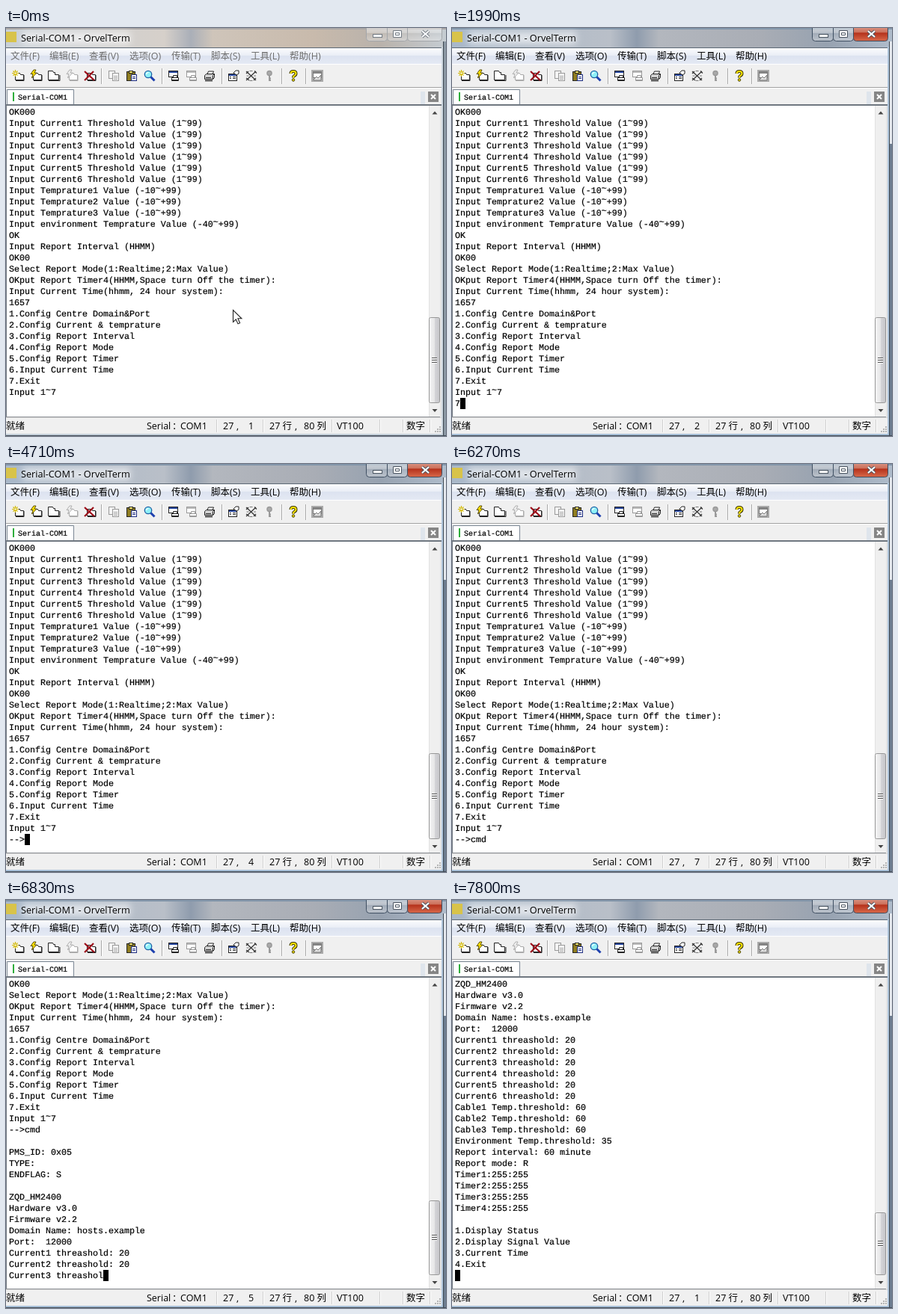
An HTML page that plays this animation: 588x546 px, repeating every 8 s.

```html
<!DOCTYPE html>
<html lang="zh">
<head>
<meta charset="utf-8">
<title>Serial console</title>
<style>
html, body { margin: 0; width: 100%; height: 100%; overflow: hidden; }
svg { display: block; }
text { white-space: pre; font: 12.5px "Open Sans", "Noto Sans CJK SC", "Noto Sans CJK", sans-serif; fill: #000; }
.mono text, text.tab { font-family: "Liberation Mono", monospace; text-rendering: geometricPrecision; stroke: #000; stroke-width: .2; }
.mono text { font-size: 11.665px; }
text.tab { font-size: 10px; }
text.caption { font-size: 12.7px; }
</style>
</head>
<body>
<svg id="stage" width="588" height="546" viewBox="0 0 588 546">
<defs>
  <linearGradient id="idle"><stop offset="0" stop-color="#c9d0d7"/><stop offset=".36" stop-color="#d6d0ca"/><stop offset=".42" stop-color="#aaafb8"/><stop offset=".47" stop-color="#cfc5ba"/><stop offset=".7" stop-color="#c8baac"/><stop offset=".85" stop-color="#b9b2ab"/><stop offset="1" stop-color="#c5ccd2"/></linearGradient>
  <linearGradient id="live"><stop offset="0" stop-color="#a9b8c9"/><stop offset=".36" stop-color="#b9bfc8"/><stop offset=".42" stop-color="#8f9cad"/><stop offset=".47" stop-color="#b3b7be"/><stop offset=".7" stop-color="#a9adb5"/><stop offset=".85" stop-color="#97a2b0"/><stop offset="1" stop-color="#afbccb"/></linearGradient>
  <linearGradient id="menu" x2="0" y2="1"><stop offset="0" stop-color="#fbfcfe"/><stop offset=".45" stop-color="#eaeef6"/><stop offset=".5" stop-color="#dde3f0"/><stop offset="1" stop-color="#e4e9f4"/></linearGradient>
  <linearGradient id="red" x2="0" y2="1"><stop offset="0" stop-color="#dfa394"/><stop offset=".45" stop-color="#cc6f5a"/><stop offset=".5" stop-color="#b5321c"/><stop offset="1" stop-color="#d8694a"/></linearGradient>
  <linearGradient id="glass" x2="0" y2="1"><stop offset="0" stop-color="#fff" stop-opacity=".55"/><stop offset=".48" stop-color="#fff" stop-opacity=".35"/><stop offset=".52" stop-color="#fff" stop-opacity=".08"/><stop offset="1" stop-color="#fff" stop-opacity=".35"/></linearGradient>
  <linearGradient id="thumb"><stop offset="0" stop-color="#f5f5f5"/><stop offset=".5" stop-color="#e6e6e7"/><stop offset=".52" stop-color="#d5d5d8"/><stop offset="1" stop-color="#c6c6ca"/></linearGradient>
  <filter id="soft" x="-20%" y="-60%" width="140%" height="220%"><feGaussianBlur stdDeviation="5"/></filter>
</defs>
<g id="frame"></g>
<g id="bars"></g>
<g id="term" class="mono"></g>
<rect id="caret" y="495" width="7" height="15"/>
<g id="scroll"></g>
<g id="status"></g>
<path id="mouse" d="M303.5 377.5v16l3.8-3.6 2.7 6 2.6-1.1-2.7-6h5z" fill="#fff" stroke="#222" stroke-width="1.1"/>
</svg>
<script>
const $ = id => document.getElementById(id);
const esc = s => s.replace(/&/g, '&amp;').replace(/</g, '&lt;').replace(/>/g, '&gt;');
const rect = (x, y, w, h, fill, more = '') => `<rect x="${x}" y="${y}" width="${w}" height="${h}" fill="${fill}" ${more}/>`;
const path = (d, stroke, width = 1, fill = 'none') => `<path d="${d}" fill="${fill}" stroke="${stroke}" stroke-width="${width}"/>`;
const text = (x, y, s, more = '') => `<text x="${x}" y="${y}" ${more}>${esc(s)}</text>`;
const range = (n, fn) => Array.from({ length: n }, (_, i) => fn(i + 1));

// Console contents
const ROWS = 27, LEFT = 4, CHAR = 7, LINE = 15;
const log = [
  'OK000',
  ...range(6, i => `Input Current${i} Threshold Value (1~99)`),
  ...range(3, i => `Input Temprature${i} Value (-10~+99)`),
  'Input environment Temprature Value (-40~+99)',
  'OK', 'Input Report Interval (HHMM)', 'OK00',
  'Select Report Mode(1:Realtime;2:Max Value)',
  'OKput Report Timer4(HHMM,Space turn Off the timer):',
  'Input Current Time(hhmm, 24 hour system):', '1657',
  '1.Config Centre Domain&Port', '2.Config Current & temprature',
  '3.Config Report Interval', '4.Config Report Mode',
  '5.Config Report Timer', '6.Input Current Time', '7.Exit', 'Input 1~7'
];
const reply = [
  '-->cmd', '', 'PMS_ID: 0x05', 'TYPE:', 'ENDFLAG: S', '',
  'ZQD_HM2400', 'Hardware v3.0', 'Firmware v2.2',
  'Domain Name: hosts.example', 'Port:  12000',
  ...range(6, i => `Current${i} threashold: 20`),
  ...range(3, i => `Cable${i} Temp.threshold: 60`),
  'Environment Temp.threshold: 35', 'Report interval: 60 minute', 'Report mode: R',
  ...range(4, i => `Timer${i}:255:255`), '',
  '1.Display Status', '2.Display Signal Value', '3.Current Time', '4.Exit', ''
].join('\n');
const upTo = s => reply.slice(0, reply.indexOf(s) + s.length);

// The console font has a raised tilde
const consoleLine = (s, i) => text(LEFT, 115.5 + i * LINE, s)
  .replace('~', '<tspan dy="-3">~</tspan><tspan dy="3">\u200b</tspan>')
  .replace('\u200b</tspan>', '</tspan>')
  .replace(/<tspan dy="3"><\/tspan>(.*)<\/text>/, '<tspan dy="3">$1</tspan></text>');

// [start ms, text after the log, caret shown, column in the status bar]
const steps = [
  [0, '', 0, 1], [500, '', 1, 1], [1030, '', 0, 1], [1560, '', 1, 1],
  [1990, '7', 1, 2], [2140, '7', 0, 2],
  [2450, '-->', 1, 4], [3160, '-->', 0, 4], [3600, '-->', 1, 4],
  [4150, '-->', 0, 4], [4710, '-->', 1, 4], [5270, '-->', 0, 4],
  [5730, '-->c', 1, 5], [5850, '-->cm', 1, 6], [6000, '-->cmd', 1, 7], [6270, '-->cmd', 0, 7],
  [6680, upTo('ZQD_HM'), 0, 1],
  [6830, upTo('Current3 threashol'), 1, 5],
  [6980, upTo('Cable3 Temp'), 1, 12],
  [7100, upTo('Timer1:255:255\nT'), 1, 30],
  [7250, reply, 0, 1], [7800, reply, 1, 1]
];
const LOOP = 8000, FOCUS = 500, MOUSE_END = 1990;

// Window frame and caption
function drawFrame(active) {
  const ink = active ? '#3f4f62' : '#a3a6aa';
  const button = (x, w, fill) => rect(x, -4, w, 21.5, fill, `rx="4" stroke="${ink}"`);
  const glyph = active ? '#fff' : '#f6f8fa';
  const edge = active ? '#4a5561' : '#747b83';
  $('frame').innerHTML =
    rect(0, 0, 588, 546, active ? 'url(#live)' : 'url(#idle)') +
    rect(0, 0, 588, 2, active ? '#8396aa' : '#a9a6a6') +
    rect(22, 5, 144, 17, '#fff', 'opacity=".6" filter="url(#soft)"') +
    rect(0, 5, 14, 14, '#d8c34a') +
    text(20, 17.5, 'Serial-COM1 - OrvelTerm', 'class="caption"') +
    button(481.5, 28, 'url(#glass)') + button(509.5, 27, 'url(#glass)') +
    button(536.5, 46, active ? 'url(#red)' : 'url(#glass)') +
    rect(490.5, 8.5, 12, 4, glyph, `stroke="${edge}"`) +
    path('M517.5 3.5h11v9h-11zM520.5 6.5h5v3h-5z', edge, 1, glyph) +
    path('M556 4l9 8M565 4l-9 8', edge, 4) + path('M556 4l9 8M565 4l-9 8', glyph, 2.2) +
    rect(582, 25, 2, 521, active ? '#b3c9df' : '#cfd9e2') +
    rect(584, 18, 1, 528, '#3c4650') +
    rect(585, 18, 3, 528, active ? '#6d7d90' : '#8b98a4') +
    (active ? rect(585, 18, 3, 137, '#e3e7ec') : '') +
    rect(0, 543, 584, 2, active ? '#a8c0d8' : '#c5d0da') + rect(0, 545, 588, 1, '#414b56');
  const names = ['文件(F)', '编辑(E)', '查看(V)', '选项(O)', '传输(T)', '脚本(S)', '工具(L)', '帮助(H)'];
  const xs = [6, 58, 111, 165, 221, 274, 327, 379];
  $('bars').innerHTML =
    rect(0, 26, 582, 1, '#5c6874') + rect(0, 27, 582, 21, 'url(#menu)') +
    names.map((s, i) => text(xs[i], 42, s, active ? '' : 'style="fill:#6d6d6d"')).join('') +
    toolbar + tabs;
}

// Toolbar icons are drawn in a 16 x 16 cell
const sheet = (x, y, w, h, c = '#222', fill = '#fff') =>
  rect(x + .5, y + .5, w, h, fill, `stroke="${c}"`);
const win = (x, y, w, h, c = '#222', bar = '#24449c') => sheet(x, y, w, h, c) + rect(x + 1, y + 1, w - 1, 2, bar);
const tabbed = c => path('M4.500 13.500V4.500h6l1 2h4v7z', c, 1, '#fff') + path('M5 14.500h11V7', c);
const bolt = (c, fill) => path('M5 0L1 5.500h3L2.500 11l6.500-7H6l2-4z', c, .9, fill);
const printer = (c, fill) =>
  path('M4.500 7l2-5h7l-2 5', c, 1, '#fff') + path('M1.500 7.500l2-2h11l-2 2v5h-11zM12.500 12.500l2-2v-5', c, 1, fill) +
  path('M3 10.500h7', c, 1) + path('M2 14.500h10', c, 1.5);
const smallPrint = (c, bar) => win(1, 1, 12, 8, c, bar) +
  path('M5.500 10.500h9v4h-9zM7.500 10V7.500h5V10', c, 1, '#fff') + path('M6 13.500h8', c, 1);
const hook = 'M4.500 5Q4.500 2 8 2t3.500 3Q11.500 7 9 8.200 8 8.800 8 10.500';
const icons = [
  [16, tabbed('#222') + path('M4.500 0v9M0 4.500h9M1.500 1.500l6 6M7.500 1.500l-6 6', '#d2b800', 1.2) + rect(3.5, 3.5, 2, 2, '#fff')],
  [40, tabbed('#222') + bolt('#4b4200', '#ffe000')],
  [64, path('M.500 13.500v-12h6l1 2h2v3h5v7z', '#222', 1, '#fff') + path('M1 14.500h15V7', '#222')],
  [88, tabbed('#aaa') + bolt('#aaa', '#eee')],
  [112, tabbed('#222') + path('M1 2l13 12M13 2L1 14', '#9c0c18', 2.2)],
  [144, sheet(1, 1, 8, 10, '#999', '#f4f4f4') + sheet(6, 4, 8, 10, '#999', '#f4f4f4') + path('M8 8.500h5M8 10.500h5M8 12.500h5', '#aaa')],
  [168, sheet(1, 2, 11, 12, '#222', '#8f7d20') + sheet(4, 1, 5, 3, '#222', '#f3e36a') + sheet(7, 6, 7, 8, '#1c2c80') + path('M9 9.500h4M9 11.500h4', '#1c2c80')],
  [192, path('M9 9l5.500 5.500', '#1d3fae', 3) + `<circle cx="6" cy="6" r="4.7" fill="#8ff1f7" stroke="#1f5fa5" stroke-width="1.3"/>` + path('M3.500 6q.5-2.500 3-2.500', '#fff', 1.2)],
  [224, smallPrint('#222', '#24449c')],
  [248, smallPrint('#999', '#bbb')],
  [272, printer('#222', '#cfcfcf')],
  [304, win(1, 5, 11, 9) + path('M3 9.500h2M7 9.500h4M3 11.500h2M7 11.500h4', '#333') + path('M8 4l3-3h4v4l-3 2z', '#222', 1, '#fff')],
  [328, path('M1 2l13 12M14 2L1 14', '#333', 1.2) + path('M1 5l3-3M11 14l3-3M12 1.500l3 3M1 11l4 3', '#333', 1.2) + path('M5.500 1.500h4M5.500 14.500h4M1.500 8h3M11 8h3', '#777')],
  [352, `<circle cx="8" cy="4.5" r="3" fill="#aaa" stroke="#999" stroke-width="1.5"/>` + path('M8 8v7M8 11.500h2M8 14h2', '#999', 2)],
  [384, path(hook, '#3a3500', 4) + path(hook, '#ffe600', 2) + `<circle cx="8" cy="13.5" r="1.7" fill="#ffe600" stroke="#3a3500"/>`],
  [416, rect(0, 0, 16, 16, '#aaa') + win(2, 2, 11, 8, '#777', '#888') + path('M3 13l4-4 2 2 4-4v7H3z', '#777', 1, '#ddd')]
];
const toolbar =
  rect(0, 48, 582, 55, '#f0f0f0') + rect(0, 48, 582, 1, '#fff') +
  icons.map(([x, art]) => `<g transform="translate(${x - 8} 56)">${art}</g>`).join('') +
  [127, 208, 288, 368, 400].map(x => rect(x, 54, 1, 21, '#a8a8a8') + rect(x + 1, 54, 1, 21, '#fff')).join('') +
  rect(0, 79, 582, 1, '#a0a0a0') + rect(0, 80, 582, 1, '#fff');
const tabs =
  path('M1.500 103V82.500h89V103', '#7b8794', 1, '#fff') +
  rect(9, 86, 2, 12, '#2fae3c') + text(16, 95.5, 'Serial-COM1', 'class="tab"') +
  rect(554, 85, 6, 17, '#dfe5ec') +
  rect(564, 85, 14, 14, '#858585') + path('M568 89l6 6M574 89l-6 6', '#fff', 2) +
  rect(0, 102, 582, 2, '#6f7780') + rect(0, 102, 1, 419, '#6f7780') +
  rect(1, 104, 565, 416, '#fff') + rect(0, 520, 582, 1, '#8b8f94') + rect(580, 104, 2, 417, '#e4e4e4');

function drawScroll(extra) {
  const h = Math.round(115 * 87 / (87 + extra)), top = 502 - h, mid = top + Math.round(h / 2) - 3.5;
  $('scroll').innerHTML =
    rect(565, 104, 15, 416, '#efefef') + rect(565, 104, 1, 416, '#e2e2e2') +
    path('M569.500 115.500l3.500-4 3.500 4z', 'none', 0, '#444') +
    path('M569.500 510l3.500 4 3.500-4z', 'none', 0, '#444') +
    rect(565.5, top + .5, 14, h - 1, 'url(#thumb)', 'rx="2" stroke="#979797"') +
    path(`M569 ${mid}h7m-7 3h7m-7 3h7`, '#555', 1) +
    path(`M569 ${mid + 1}h7m-7 3h7m-7 3h7`, '#fff', 1);
}

function drawStatus(col) {
  const labels = [[0, '就绪'], [188, 'Serial'], [222, '：'], [233, 'COM1'], [290, '27'], [308, ','],
    [352, '27 行'], [386, ','], [398, '80 列'], [442, 'VT100'], [535, '数字']];
  let grip = '';
  for (let r = 0; r < 3; r++)
    for (let c = 2 - r; c < 3; c++) grip += rect(573 + c * 3, 533 + r * 3, 2, 2, '#b4b4b4');
  $('status').innerHTML =
    rect(0, 521, 582, 22, '#f0f0f0') + rect(0, 521, 582, 1, '#d7d7d7') +
    [281, 343, 435, 499, 530, 566].map(x => rect(x, 524, 1, 17, '#cfcfcf') + rect(x + 1, 524, 1, 17, '#fff')).join('') +
    labels.map(([x, s]) => text(x, 537, s)).join('') +
    text(327.5, 537, String(col), 'text-anchor="middle"') + grip;
}

let shown = -1;
function render(ms) {
  const t = ms % LOOP;
  const now = steps.findLastIndex(s => s[0] <= t);
  if (now === shown) return;
  shown = now;
  const [start, tail, caret, col] = steps[now];
  const added = tail.split('\n');
  drawFrame(start >= FOCUS);
  $('term').innerHTML = [...log, ...added].slice(-ROWS).map(consoleLine).join('');
  $('caret').setAttribute('x', LEFT + CHAR * added[added.length - 1].length);
  $('caret').style.display = caret ? '' : 'none';
  $('mouse').style.display = start < MOUSE_END ? '' : 'none';
  drawScroll(added.length - 1);
  drawStatus(col);
}

function tick() {
  render(performance.now());
  requestAnimationFrame(tick);
}
tick();
</script>
</body>
</html>
```
